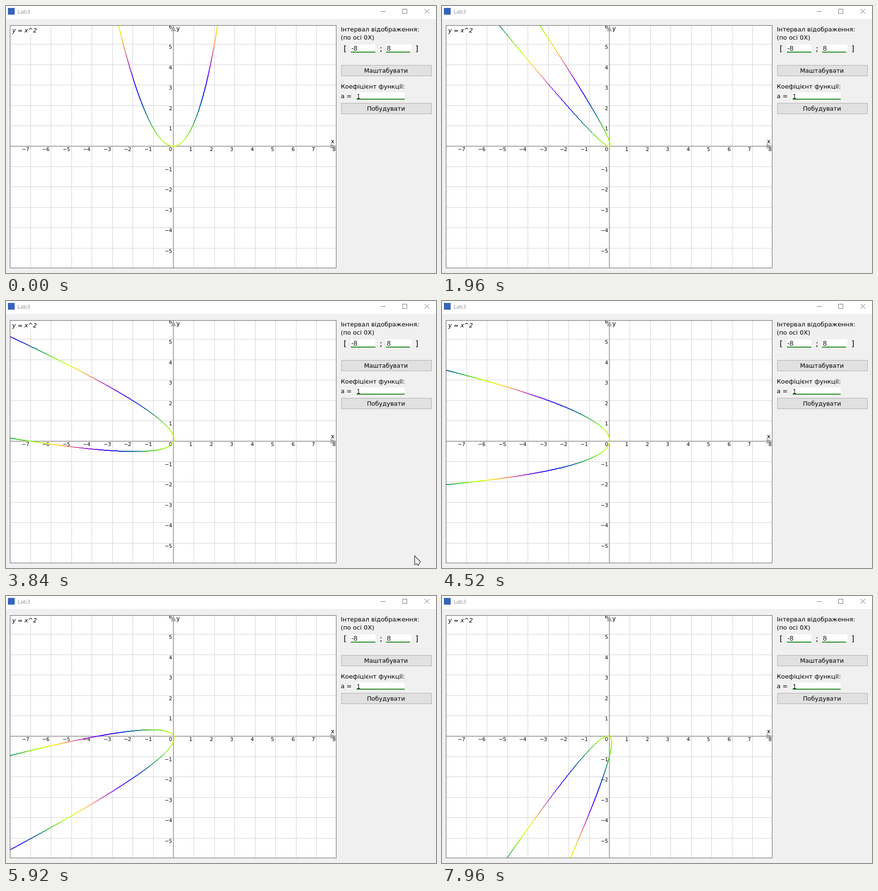
An HTML page with a canvas that plays this animation: 894x556 px, repeating every 8 s.

```html
<!DOCTYPE html>
<html lang="uk">
<head>
<meta charset="utf-8">
<title>Lab3</title>
<style>
html, body { margin: 0; width: 100%; height: 100%; overflow: hidden; background: #f0f0f0; }
canvas { display: block; }
</style>
</head>
<body>
<canvas id="stage" width="894" height="556"></canvas>
<script>
const ctx = document.getElementById('stage').getContext('2d');
const LOOP = 8000, FRAME = 40;
const OX = 348, OY = 291.5, UNIT = 679 / 16;
const PLOT = { x: 9, y: 41, w: 677, h: 504 };
const UI = '"DejaVu Sans", sans-serif';
const FIELD = '"Liberation Sans", Arial, sans-serif';

// [time, whole degrees turned]
const TURN = [[0, 0], [1960, 34], [3160, 56], [4520, 83], [5920, 109], [7120, 133], [7960, 148], [8000, 148.4]];
const START_ANGLE = 2.45;

// [time, x, y] of the pointer tip
const POINTER = [[2360, 794, 556], [2480, 800, 538], [2640, 824, 530], [2960, 764, 515],
  [3120, 760, 514], [3400, 760, 514], [3720, 826, 520], [3960, 872, 540], [4080, 873, 558]];

function at(keys, time, col) {
  let i = 1;
  while (i < keys.length - 1 && time > keys[i][0]) i++;
  const a = keys[i - 1], b = keys[i];
  return a[col] + (b[col] - a[col]) * (time - a[0]) / (b[0] - a[0]);
}

function rect(color, x, y, w, h) {
  ctx.fillStyle = color;
  ctx.fillRect(x, y, w, h);
}

function line(color, width, ...points) {
  ctx.strokeStyle = color;
  ctx.lineWidth = width;
  ctx.beginPath();
  for (let i = 0; i < points.length; i += 2) ctx.lineTo(points[i], points[i + 1]);
  ctx.stroke();
}

function shape(color, ...points) {
  ctx.fillStyle = color;
  ctx.beginPath();
  for (let i = 0; i < points.length; i += 2) ctx.lineTo(points[i], points[i + 1]);
  ctx.closePath();
  ctx.fill();
}

// Hard-edged line, two pixels across its flatter direction.
function crispLine(color, x0, y0, x1, y1) {
  const steep = Math.abs(y1 - y0) > Math.abs(x1 - x0);
  let [a0, b0, a1, b1] = steep ? [y0, x0, y1, x1] : [x0, y0, x1, y1];
  if (a0 > a1) [a0, b0, a1, b1] = [a1, b1, a0, b0];
  ctx.fillStyle = color;
  for (let a = Math.ceil(a0); a < a1; a++) {
    const b = Math.ceil(b0 + (b1 - b0) * (a - a0) / (a1 - a0) - 1);
    if (steep) ctx.fillRect(b, a, 2, 1);
    else ctx.fillRect(a, b, 1, 2);
  }
}

function text(str, x, y, font, color = '#000', align = 'left') {
  ctx.font = font;
  ctx.fillStyle = color;
  ctx.textAlign = align;
  ctx.fillText(str, x, y);
}

function titleBar() {
  rect('#fff', 0, 0, 894, 27);
  rect('#3465bd', 4, 4, 14, 14);
  text('Lab3', 24, 16, '11.5px "Open Sans", sans-serif', '#8f8f8f');
  line('#777', 1, 779, 11.5, 789, 11.5);
  ctx.strokeRect(824.5, 6.5, 9, 9);
  line('#777', 1, 870, 6, 880, 16);
  line('#777', 1, 880, 6, 870, 16);
}

function field(value, x, y, w, h, boxW, indent) {
  rect('#fff', x, y, boxW, h);
  rect('#228b22', x, y + h, w, 2);
  text(value, x + indent, y + 13, '14px ' + FIELD, '#111');
}

function button(label, y) {
  rect('#e1e1e1', 697, y, 188, 23);
  ctx.strokeStyle = '#adadad';
  ctx.lineWidth = 1;
  ctx.strokeRect(697.5, y + 0.5, 187, 22);
  text(label, 790, y + 16, '12.6px ' + UI, '#000', 'center');
}

function panel() {
  const font = '12.8px ' + UI;
  text('Інтервал відображення:', 696, 53, font);
  text('(по осі 0X)', 696, 70, font);
  text('[', 702, 94, '16px ' + UI);
  text(';', 777, 94, '16px ' + UI);
  text(']', 851, 94, '16px ' + UI);
  field('-8', 717, 80, 51, 15, 51, 1);
  field('8', 790, 80, 50, 15, 53, 2);
  button('Маштабувати', 123);
  text('Коефіцієнт функції:', 696, 172, font);
  text('a =', 696, 192, font);
  field('1', 729, 180, 100, 13, 100, 0);
  button('Побудувати', 202);
}

function axes() {
  const gray = '#a9a9a9', font = '10.5px ' + UI;
  for (let n = -7; n <= 7; n++) rect('#d3d3d3', Math.round(OX + n * UNIT), PLOT.y, 1, PLOT.h);
  for (let n = -5; n <= 5; n++) rect('#d3d3d3', PLOT.x, Math.floor(OY + 0.5 - n * UNIT), PLOT.w, 1);
  rect(gray, PLOT.x, 291, PLOT.w, 2);
  rect(gray, 347, PLOT.y, 2, PLOT.h);
  shape(gray, 348, 41, 353.5, 52.5, 342.5, 52.5);
  shape(gray, 687, 292, 674.5, 297, 674.5, 287);

  const name = n => (n < 0 ? '−' : '') + Math.abs(n);
  for (let n = -7; n <= 8; n++) text(name(n), Math.round(OX + n * UNIT) - 2.5, 302, font, '#000', 'right');
  for (let n = -5; n <= 6; n++) {
    if (n) text(name(n), 345.5, Math.round(OY - n * UNIT) + 10, font, '#000', 'right');
  }
  text('x', 675.5, 286, '12.5px ' + UI);
  text('y', 354, 51, '12.5px ' + UI);
}

function hue(u) {
  const wave = shift => Math.round(127.5 * (1 + Math.cos(u + shift)));
  return `rgb(${wave(Math.PI / 3)},${wave(0)},${wave(Math.PI)})`;
}

// The parabola turns while its width follows the cosine of the double angle.
function curve(angle) {
  const s = Math.sin(angle), c = Math.cos(angle), k = Math.cos(2 * angle);
  const px = t => OX + UNIT * (k * c * t - s * t * t);
  const py = t => OY - UNIT * (k * s * t + c * t * t);
  const step = 0.02;
  for (let i = -200; i < 200; i++) {
    const t = i * step, next = (i + 1) * step, mid = t + step / 2;
    crispLine(hue(mid * mid), px(t), py(t), px(next), py(next));
  }
}

function plot(angle) {
  rect('#fff', PLOT.x, PLOT.y, PLOT.w, PLOT.h);
  ctx.save();
  ctx.beginPath();
  ctx.rect(PLOT.x, PLOT.y, PLOT.w, PLOT.h);
  ctx.clip();
  axes();
  curve(angle);
  rect('#fff', 11, 43, 57, 15);
  text('y = x^2', 13, 55, 'italic 12.4px ' + UI);
  ctx.restore();
  ctx.strokeStyle = '#646464';
  ctx.lineWidth = 1;
  ctx.strokeRect(8.5, 40.5, 678, 505);
}

function pointer(time) {
  if (time < POINTER[0][0] || time > POINTER[POINTER.length - 1][0]) return;
  ctx.save();
  ctx.translate(Math.round(at(POINTER, time, 1)), Math.round(at(POINTER, time, 2)));
  shape('#ececec', 0.5, 0.5, 12.5, 12.5, 8, 20.5, 5, 17.5, 0.5, 19);
  ctx.strokeStyle = '#222';
  ctx.lineWidth = 1.1;
  ctx.stroke();
  ctx.restore();
}

function draw(now) {
  const time = Math.floor((now % LOOP) / FRAME) * FRAME;
  const degrees = START_ANGLE + Math.round(at(TURN, time, 1));
  rect('#f0f0f0', 0, 0, 894, 556);
  titleBar();
  panel();
  plot(degrees * Math.PI / 180);
  pointer(time);
}

let begin = null;
function tick(now) {
  if (begin === null) begin = now;
  draw(Math.max(0, now - begin));
  requestAnimationFrame(tick);
}
draw(0);
requestAnimationFrame(tick);
</script>
</body>
</html>
```
